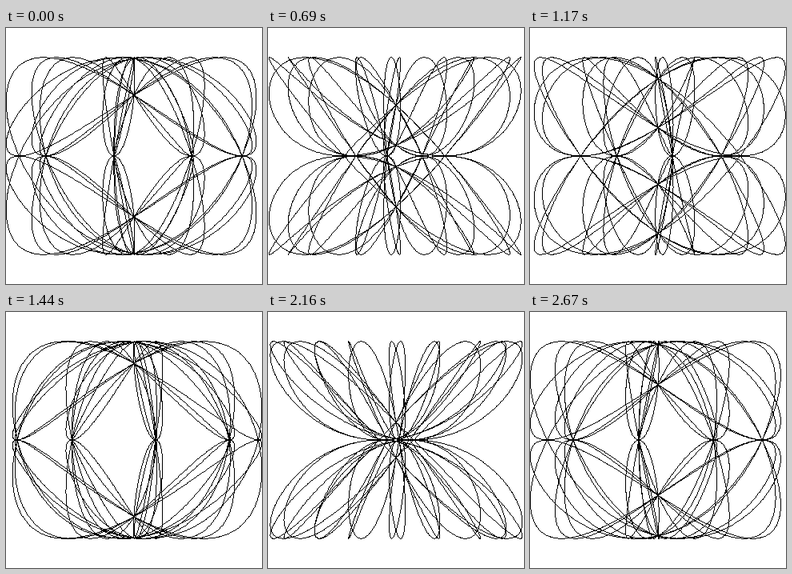
An HTML page with a canvas for the animation above (2700 ms loop, 320 by 320 pixels).

```html
<!DOCTYPE html>
<html lang="en">
<head>
<meta charset="utf-8">
<title>Turning curve</title>
<style>
  html, body { margin: 0; height: 100%; overflow: hidden; background: #fff; }
  canvas { display: block; }
</style>
</head>
<body>
<canvas width="320" height="320"></canvas>
<script>
const SIZE = 320, R = SIZE / 2;
const STEP_MS = 30, STEPS = 90, SEGMENTS = 1800;
const START_PHASE = 64 * Math.PI / 180;
const BLACK = 0xff000000, WHITE = 0xffffffff;

const ctx = document.querySelector('canvas').getContext('2d');
const image = ctx.createImageData(SIZE, SIZE);
const pixels = new Uint32Array(image.data.buffer);

function curvePoint(t, phase) {
  return [
    R - R * Math.cos(t) * Math.sin(9 * t + phase),
    R + R * Math.sin(4.5 * t) * Math.sin(9 * t)
  ];
}

// Hard-edged line, one pixel wide
function line([x0, y0], [x1, y1]) {
  const dx = x1 - x0, dy = y1 - y0;
  const n = Math.ceil(Math.max(Math.abs(dx), Math.abs(dy))) || 1;
  for (let i = 0; i <= n; i++) {
    const x = Math.floor(x0 + dx * i / n);
    const y = Math.floor(y0 + dy * i / n);
    if (x >= 0 && x < SIZE) pixels[y * SIZE + x] = BLACK;
  }
}

function draw(step) {
  const phase = START_PHASE + step / STEPS * 2 * Math.PI;
  pixels.fill(WHITE);
  let last = curvePoint(0, phase);
  for (let i = 1; i <= SEGMENTS; i++) {
    const next = curvePoint(i / SEGMENTS * 4 * Math.PI, phase);
    line(last, next);
    last = next;
  }
  ctx.putImageData(image, 0, 0);
}

const start = performance.now();
let shown = -1;
function tick() {
  const step = Math.floor((performance.now() - start) / STEP_MS) % STEPS;
  if (step !== shown) draw(shown = step);
  requestAnimationFrame(tick);
}
tick();
</script>
</body>
</html>
```
